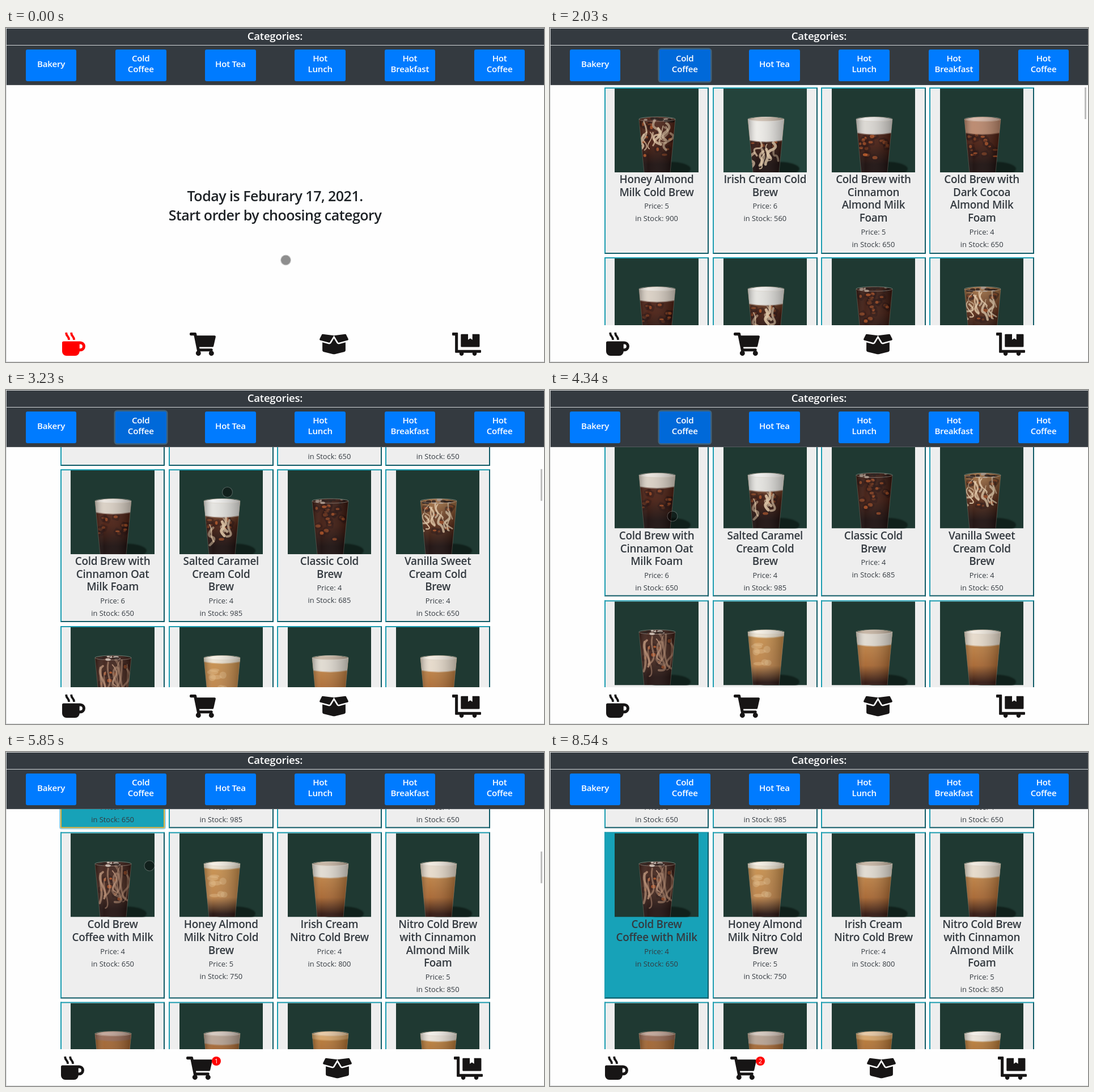
These frames come from a looping animation (949x590 px, 8.64 s). An HTML page:

```html
<!DOCTYPE html>
<html lang="en">
<head>
<meta charset="utf-8">
<title>Order screen</title>
<style>
html, body { margin: 0; width: 100%; height: 100%; overflow: hidden; }
body { background: #fefefe; font-family: "Open Sans", "Noto Sans", sans-serif; }
#stage { position: relative; width: 949px; height: 590px; overflow: hidden; white-space: nowrap; text-align: center; }
#stage div, #stage svg { position: absolute; box-sizing: border-box; }
.header { left: 0; top: 0; width: 949px; height: 101px; background: #343a40; border-bottom: 1px solid #565b60; }
.heading { left: 0; top: 0; width: 949px; height: 31px; border-bottom: 1px solid #d3d6d8; color: #fff; font: 600 18.6px/27px "Open Sans", sans-serif; letter-spacing: -.015em; }
.button { top: 37.5px; width: 89.5px; height: 56.5px; padding-bottom: 5px; border-radius: 3px; background: #007bff; color: #fff; font-size: 15.1px; font-weight: 600; line-height: 19.4px; letter-spacing: -.015em; display: flex; align-items: center; justify-content: center; }
.button.on { background: #0069d9; }
.button.focus { box-shadow: 0 0 0 2.5px rgba(72, 140, 190, .5); }
.hero { left: 0; top: 278.5px; width: 949px; color: #1f2327; font-size: 25px; font-weight: 600; line-height: 34px; letter-spacing: -.02em; }
.view { left: 0; top: 101px; width: 949px; height: 424px; overflow: hidden; }
.list { left: 0; top: -101px; }
.card { width: 184.6px; background: #eee; border: 2px solid; border-color: #1c9db1 #0f5a66 #0f5a66 #1c9db1; color: #343a40; }
.card.on { background: #17a2b8; }
.card.focus { border-color: #dcae3c; border-radius: 2px; box-shadow: 0 0 0 2px #98d2e6; }
.card svg { left: 16.5px; top: 0; }
.title { left: 0; top: 149px; width: 100%; font-size: 18.9px; font-weight: 600; line-height: 22.67px; letter-spacing: -.015em; }
.facts { left: 0; width: 100%; font-size: 12.9px; line-height: 22px; }
.thumb { left: 943px; top: 105px; width: 3px; height: 56px; background: #bdbdbd; }
.nav { left: 0; top: 525px; width: 949px; height: 65px; background: #fefefe; }
.nav svg { top: 13px; height: 41px; fill: #171515; overflow: visible; }
.badge { left: 363px; top: 13px; width: 16px; height: 16px; border-radius: 50%; background: #f00; color: #fff; font-size: 11.5px; line-height: 16px; }
.cursor { left: -9.5px; top: -9.5px; width: 19px; height: 19px; border-radius: 50%; background: rgba(0, 0, 0, .44); border: 1.5px solid rgba(150, 150, 150, .45); background-clip: padding-box; }
.frame { inset: 0; border: 1px solid #d9dbdc; border-right: 0; }
</style>
</head>
<body>
<div id="stage">
  <svg width="0" height="0"><clipPath id="glass"><path d="M43 54Q75 46 107 54L98 148H52z"/></clipPath></svg>
  <div class="hero">Today is Feburary 17, 2021.<br>Start order by choosing category</div>
  <div class="view"><div class="list"></div></div>
  <div class="thumb"></div>
  <div class="nav">
    <svg width="41" viewBox="0 0 512 512">
      <path fill-rule="evenodd" d="M0 224a32 32 0 0 1 32-32H400a112 112 0 0 1 0 224H384a96 96 0 0 1-96 96H96a96 96 0 0 1-96-96zM384 256v96h16a48 48 0 0 0 0-96z"/>
      <path id="steam" fill="none" stroke-width="48" stroke-linejoin="round" d="M88 0Q92 52 122 84Q148 112 152 160M200 0Q204 52 234 84Q260 112 264 160"/>
    </svg>
    <svg width="46" viewBox="0 0 576 512"><path d="M24 0H127Q146 2 150 19L159 64H552Q580 68 575 93L528 301Q522 320 505 320H212L218 352H487Q512 355 510 381L504 406A56 56 0 1 1 441 416H231A56 56 0 1 1 164 407L94 64H24Q0 62 0 40V24Q2 0 24 0z"/></svg>
    <svg width="51" viewBox="0 0 640 512"><path d="M320 126L256 233Q236 260 201 254L64 215V393Q66 418 88 424L304 478Q320 482 336 478L552 424Q574 418 576 393V215L439 254Q404 260 384 233zM320 64L412 216Q418 226 430 223L628 167Q644 160 638 144L587 41Q581 31 570 32zM320 64L228 216Q222 226 210 223L12 167Q-4 160 2 144L53 41Q59 31 70 32z"/></svg>
    <svg width="51" viewBox="0 0 640 512"><path d="M208 32H352V160L400 128L448 160V32H592Q608 32 608 48V304Q608 320 592 320H208Q192 320 192 304V48Q192 32 208 32zM16 0H112Q128 0 128 16V384H624Q640 384 640 400V432Q640 448 624 448H541A48 48 0 1 1 451 448H253A48 48 0 1 1 163 448H80Q64 448 64 432V64H16Q0 64 0 48V16Q0 0 16 0z"/></svg>
    <div class="badge"></div>
  </div>
  <div class="header"><div class="heading">Categories:</div></div>
  <div class="frame"></div>
  <div class="cursor"></div>
</div>
<script>
const LOOP = 8640;
const $ = s => document.querySelector(s);
const add = (parent, cls, html = '') => {
  const el = document.createElement('div');
  el.className = cls;
  el.innerHTML = html;
  return parent.appendChild(el);
};
const breaks = s => s.replaceAll('|', '<br>');

const random = seed => () => (seed = (seed * 16807) % 2147483647) / 2147483647;

// foam colour, foam bottom, liquid top / middle / bottom, cream strokes, ice pieces
const dark = ['#4b2013', '#431609', '#120504'];
const gold = ['#c58a48', '#a4612a', '#2a0e07'];
const drinks = [
  ['', 58, ...dark, 13, 14],
  ['#eceae6', 92, '#a5632b', '#3a170c', '#120504', 9, 5],
  ['#d9d6d1', 79, ...dark, 0, 16],
  ['#b88468', 79, ...dark, 0, 16],
  ['#d8cec2', 75, ...dark, 0, 14],
  ['#e3e2de', 81, '#9a6238', '#42180b', '#120504', 6, 10],
  ['', 58, '#35150c', '#3c150a', '#120504', 0, 20],
  ['', 58, '#99683d', '#542611', '#140605', 13, 9],
  ['', 58, '#3a1c14', '#45251a', '#1a0907', 12, 8],
  ['#ece2d0', 62, '#c68d48', '#b97e43', '#1c0906', 0, 0],
  ['#dfd9cf', 77, ...gold, 0, 0],
  ['#e5d9c9', 77, ...gold, 0, 0],
  ['#946650', 65, '#a0632c', '#96572a', '#2a0e07', 0, 0],
  ['#b5a090', 72, '#a86a31', '#96572a', '#2a0e07', 0, 0],
  ['#d3a063', 64, '#b87831', '#96572a', '#2a0e07', 0, 0],
  ['#e9e2d8', 66, '#bd8138', '#96572a', '#2a0e07', 0, 0]
];

function drinkSvg([foam, edge, top, mid, low, cream, ice], i) {
  const rnd = random(977 * (i + 3));
  const span = (a, b) => +(a + rnd() * (b - a)).toFixed(1);
  const golden = i > 8;
  let inside = '';
  for (let k = 0; k < ice; k++) {
    const x = span(50, 98), y = span(edge + 3, 122);
    inside += `<rect x="${x - 6}" y="${y - 5}" width="13" height="11" rx="3" fill="#190604" opacity=".4" transform="rotate(${span(-40, 40)} ${x} ${y})"/>` +
      `<ellipse cx="${x}" cy="${y}" rx="${span(2, 5)}" ry="${span(1.5, 3.5)}" fill="#c4571f" opacity="${span(.3, .8)}"/>`;
  }
  for (let k = 0; k < cream; k++) {
    const long = i === 8 ? 1.7 : 1;
    inside += `<path d="M${span(48, 100)} ${span(edge - 2, edge + 24)}q${span(-14, 14)} ${span(6, 14)} ${span(-5, 5)} ${span(12, 20) * long}t${span(-9, 9)} ${span(8, 16) * long}" fill="none" stroke="${i === 8 ? '#b78a6e' : '#e5c9a6'}" stroke-width="${span(1.5, 5)}" stroke-linecap="round" opacity="${span(.5, .95)}"/>`;
  }
  if (i === 9) for (let k = 0; k < 8; k++)
    inside += `<ellipse cx="${span(55, 94)}" cy="${span(72, 122)}" rx="${span(5, 12)}" ry="${span(3, 8)}" fill="#e0b883" opacity=".45"/>`;
  let surface = '';
  if (foam) {
    surface = `<path d="M40 48H110V${edge - 2}Q75 ${edge + 5} 40 ${edge - 2}z" fill="${foam}"/>` +
      `<path d="M40 ${edge - 2}Q75 ${edge + 5} 110 ${edge - 2}" fill="none" stroke="${foam}" stroke-width="3" opacity=".5"/>` +
      `<ellipse cx="75" cy="54" rx="30" ry="3.3" fill="${[1, 10].includes(i) ? '#9c7558' : '#fff'}" opacity=".4"/>`;
  } else {
    for (let k = 0; k < 14; k++)
      surface += `<ellipse cx="${span(48, 102)}" cy="${span(51, 58)}" rx="${span(2, 6)}" ry="${span(1, 3)}" fill="${k % 3 ? '#1d100c' : i > 7 ? '#dacbbf' : '#a79487'}" opacity=".85"/>`;
  }
  return `<svg width="147.5" height="147.5" viewBox="0 0 147.5 147.5">
    <linearGradient id="g${i}" x2="0" y2="1"><stop offset=".12" stop-color="${top}"/><stop offset="${golden ? .66 : .5}" stop-color="${mid}"/><stop offset="${golden ? .95 : .86}" stop-color="${low}"/></linearGradient>
    <linearGradient id="s${i}"><stop stop-color="#000" stop-opacity=".3"/><stop offset=".25" stop-color="#fff" stop-opacity=".07"/><stop offset="1" stop-color="#000" stop-opacity=".3"/></linearGradient>
    <rect width="148" height="148" fill="${i === 1 ? '#24433b' : '#1f3932'}"/>
    <ellipse cx="99" cy="142" rx="35" ry="12.5" fill="#10201b" style="filter:blur(1px)"/>
    <g clip-path="url(#glass)">
      <rect x="40" y="46" width="70" height="102" fill="url(#g${i})"/>
      <g style="filter:blur(.5px)">${inside}</g>${surface}
      <rect x="43" y="46" width="64" height="102" fill="url(#s${i})"/>
    </g>
    <path d="M43 54L52 148M107 54L98 148" stroke="#d8c9b8" stroke-width=".8" opacity=".3"/>
    <ellipse cx="75" cy="54" rx="32" ry="4" fill="none" stroke="#d5ccc2" stroke-width=".8" opacity=".55"/>
  </svg>`;
}

const items = [
  ['Honey Almond|Milk Cold Brew', 5, 900],
  ['Irish Cream Cold|Brew', 6, 560],
  ['Cold Brew with|Cinnamon|Almond Milk|Foam', 5, 650],
  ['Cold Brew with|Dark Cocoa|Almond Milk|Foam', 4, 650],
  ['Cold Brew with|Cinnamon Oat|Milk Foam', 6, 650],
  ['Salted Caramel|Cream Cold|Brew', 4, 985],
  ['Classic Cold|Brew', 4, 685],
  ['Vanilla Sweet|Cream Cold|Brew', 4, 650],
  ['Cold Brew|Coffee with Milk', 4, 650],
  ['Honey Almond|Milk Nitro Cold|Brew', 5, 750],
  ['Irish Cream|Nitro Cold Brew', 4, 800],
  ['Nitro Cold Brew|with Cinnamon|Almond Milk|Foam', 5, 850]
];
const rows = [[105, 293.5], [405, 270], [682.4, 293.2], [982.4, 293.2]];

const buttons = ['Bakery', 'Cold|Coffee', 'Hot Tea', 'Hot|Lunch', 'Hot|Breakfast', 'Hot|Coffee'].map((name, i) => {
  const el = add($('.header'), 'button', `<span>${breaks(name)}</span>`);
  el.style.left = 34.8 + i * 158.2 + 'px';
  return el;
});

const cards = drinks.map((drink, i) => {
  const card = add($('.list'), 'card', drinkSvg(drink, i));
  const [top, height] = rows[i >> 2];
  Object.assign(card.style, { left: 95.8 + (i % 4) * 191.2 + 'px', top: top + 'px', height: height + 'px' });
  if (items[i]) {
    const [title, price, stock] = items[i];
    add(card, 'title', breaks(title));
    add(card, 'facts', `Price: ${price}<br>in Stock: ${stock}`).style.top = 151 + 22.67 * title.split('|').length + 'px';
  }
  return card;
});

// Each track lists [start time, values held until the next entry].
const scroll = [[0, 0], [2480, 18], [2600, 55], [2720, 96], [2840, 125], [2960, 136.5],
  [3110, 190], [3230, 265], [3350, 310.5], [5490, 328], [5610, 353.5], [5730, 455], [5850, 540.5]];
const bar = [[0, 0], [1910, 1], [2180, .5], [2330, 0], [2480, 1], [3740, .5], [3860, 0], [5490, 1], [6250, .5], [6370, 0]];
const away = -50;
const pointer = [[0, 493, 409.5], [250, 481, 407.5], [400, 465, 390], [520, 440, 363], [640, 415.5, 336.5],
  [790, 365, 260], [910, 311.5, 174.5], [1060, 264, 120.5], [1210, 242.5, 56.5], [1610, away, away],
  [1760, 246.5, 107], [1910, away, away], [2180, 334.5, 308.5], [2330, 386.5, 305.5],
  [3110, 388, 240], [3230, 390, 180], [3350, 390, 147.5], [3740, 350, 160], [3860, 310, 185],
  [3980, 270, 215], [4100, 236, 237], [4220, 220, 230], [4340, 215.5, 222.5],
  [4980, 222, 250], [5100, 232, 295], [5220, 242, 335], [5350, 247, 360.5],
  [5730, 250, 275], [5850, 252.5, 200.5], [6100, 256.5, 224.5], [6250, 224, 254], [6370, 191.5, 283],
  [7100, 202, 300], [7220, 212.5, 315], [7370, away, away], [7640, 370.5, 474.5], [7760, away, away]];
const at = (track, t) => track.findLast(key => key[0] <= t).slice(1);

const icons = document.querySelectorAll('.nav svg');
const iconX = { plain: [99, 323.5, 552.5, 787], counted: [97, 317.5, 558.5, 789.5] };

function setState(el, on, focus) {
  el.classList.toggle('on', on);
  el.classList.toggle('focus', focus);
}

function draw(now) {
  const t = now % LOOP;
  const within = (a, b) => t >= a && t < b;
  const listed = t >= 1910, counted = t >= 4860;
  const [y] = at(scroll, t);
  const [px, py] = at(pointer, t);

  $('.hero').style.display = listed ? 'none' : '';
  $('.view').style.display = listed ? '' : 'none';
  $('.list').style.transform = `translateY(${-y}px)`;
  $('.thumb').style.opacity = at(bar, t)[0];
  $('.thumb').style.transform = `translateY(${y * .131}px)`;
  $('.cursor').style.transform = `translate(${px}px, ${py}px)`;

  setState(buttons[1], within(1490, 4620), within(1610, 4620));
  setState(cards[4], within(4620, 6860), within(4740, 6860));
  setState(cards[8], t >= 6860, within(6860, 8540));

  icons.forEach((icon, i) => icon.style.left = iconX[counted ? 'counted' : 'plain'][i] + 'px');
  const mug = t < 1610 ? '#f00' : '#171515';
  icons[0].style.fill = mug;
  $('#steam').style.stroke = mug;
  $('.badge').style.display = counted ? '' : 'none';
  $('.badge').textContent = t < 6860 ? 1 : 2;
}

function tick() {
  draw(performance.now());
  requestAnimationFrame(tick);
}
tick();
</script>
</body>
</html>
```
